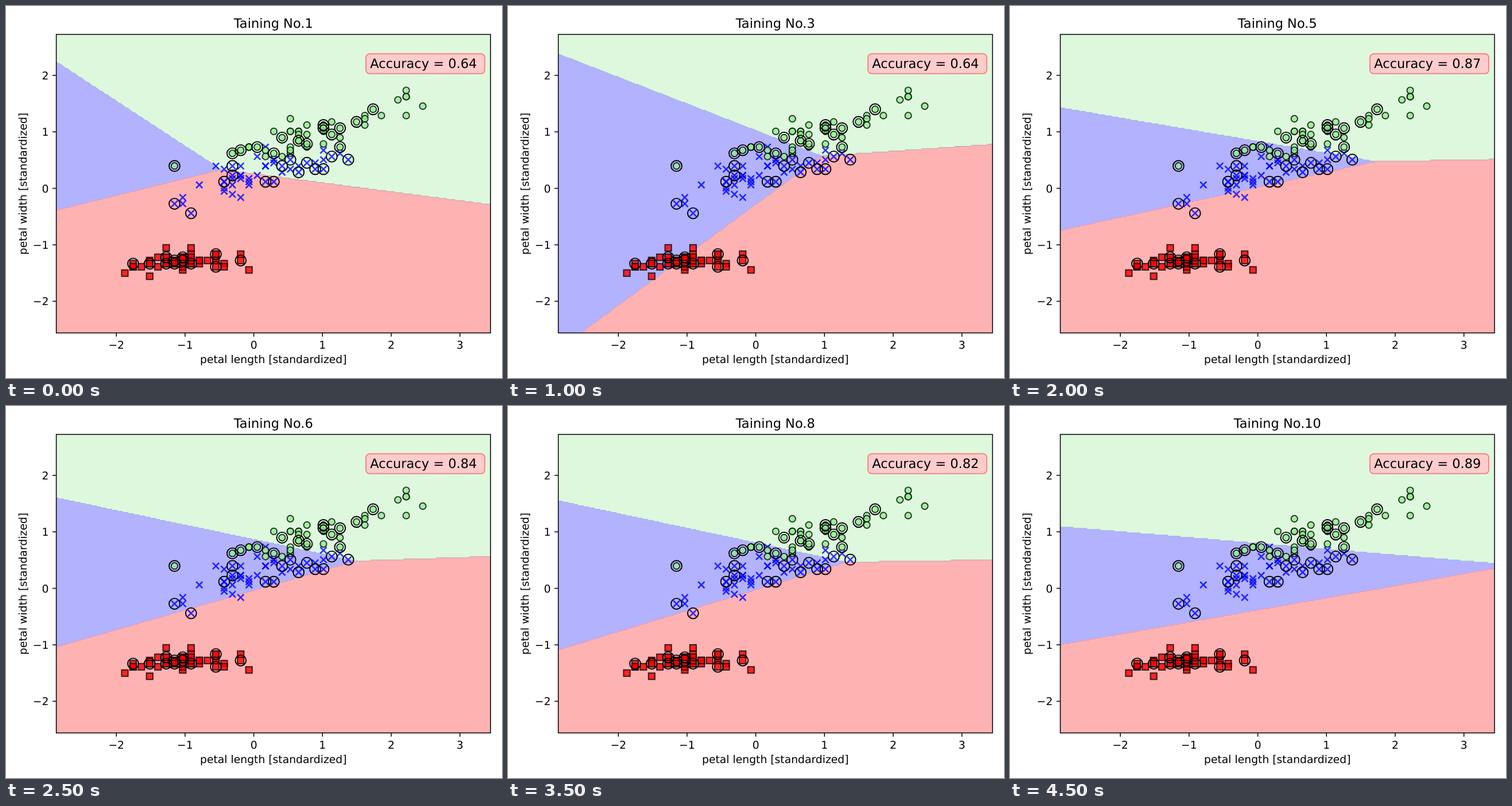
Animation, 864 px wide and 648 px high, one loop 5 s. Source, as an HTML page:

```html
<!DOCTYPE html>
<html lang="en">
<head>
<meta charset="utf-8">
<title>Training steps</title>
<style>
  html, body { margin: 0; width: 100%; height: 100%; overflow: hidden; background: #fff; }
  svg { display: block; width: 864px; height: 648px; }
  text { font: 18.75px "DejaVu Sans", sans-serif; text-rendering: geometricPrecision; }
  .big { font-size: 22.5px; }
</style>
</head>
<body>
<svg id="stage" viewBox="0 0 864 648">
  <clipPath id="plot"><rect x="87.6" y="49.5" width="756.4" height="520"/></clipPath>
  <g id="regions" clip-path="url(#plot)" fill="none"></g>
  <g id="points"></g>
  <g id="axes" fill="none" stroke="#000" stroke-width="1.5"></g>
  <g id="labels"></g>
</svg>
<script>
const STEP_MS = 500;
const LEFT = 87.6, TOP = 49.5, RIGHT = 844, BOTTOM = 569.5;

// Left end of both blue borders, the junction, right end, score.
const steps = [
  { upper: 97, lower: 356, meet: [375, 285], right: 346, score: '0.64' },
  { upper: 207, lower: 410, meet: [635, 290.5], right: 283, score: '0.87' },
  { upper: 83.5, lower: 598.5, meet: [547, 261.3], right: 241, score: '0.64' },
  { upper: 170, lower: 385, meet: [560, 274], right: 285, score: '0.80' },
  { upper: 177, lower: 391, meet: [637, 271], right: 267, score: '0.87' },
  { upper: 160, lower: 420, meet: [610, 270], right: 262, score: '0.84' },
  { upper: 106, lower: 510, meet: [602, 259.3], right: 241, score: '0.78' },
  { upper: 165, lower: 425, meet: [590, 272], right: 268, score: '0.82' },
  { upper: 204, lower: 411, meet: [413, 293.5], right: 310, score: '0.69' },
  { upper: 210, lower: 416, meet: [878, 277], right: 277, score: '0.89' }
];

// Tenths of a unit: column -> rows.
const classes = [
  { shape: 'square', color: '#f00', rows: {
    43: [11], 44: [14, 13, 13], 45: [13], 46: [15, 14, 10, 14], 47: [13, 16],
    48: [16, 14, 19, 16, 14], 49: [14, 15, 15, 14],
    50: [14, 15, 16, 16, 12, 13, 16, 14], 51: [14, 14, 15, 15, 17, 15, 19, 16],
    52: [15, 14, 15], 53: [15], 54: [17, 15, 17, 15, 13], 55: [14, 13],
    57: [17, 15], 58: [12] } },
  { shape: 'cross', color: '#00f', rows: {
    49: [33], 50: [35, 33], 51: [30], 52: [39], 54: [45], 55: [40, 38, 37, 40, 44],
    56: [36, 45, 39, 41, 42], 57: [45, 35, 42, 42, 41], 58: [41, 39, 40],
    59: [42, 48], 60: [40, 45, 51, 45], 61: [47, 40, 47, 46], 62: [45, 43],
    63: [47, 49, 44], 64: [45, 43], 65: [46], 66: [46, 44], 67: [44, 50, 47],
    68: [48], 69: [49], 70: [47] } },
  { shape: 'dot', color: '#90ee90', rows: {
    49: [45], 56: [49], 57: [50], 58: [51, 51, 51], 59: [51], 60: [50, 48],
    61: [49, 56], 62: [48, 54], 63: [60, 56, 49, 51, 56, 50],
    64: [53, 53, 56, 56, 55], 65: [58, 51, 55, 52], 67: [58, 57, 56, 57, 52],
    68: [55, 59], 69: [57, 54, 51], 71: [59], 72: [61, 60, 58], 73: [63],
    74: [61], 76: [66], 77: [67, 69, 67, 61], 79: [64] } }
];
const tested = {
  44: [14], 46: [14], 48: [16, 14], 49: [15, 14, 33, 45], 50: [16, 15], 51: [14, 30],
  54: [17, 13], 55: [40], 56: [45, 42, 49], 57: [15, 50], 59: [51], 60: [40],
  61: [40, 49], 62: [45, 54], 63: [47], 64: [43, 53], 65: [46, 52], 66: [44],
  67: [44, 58, 57], 68: [48, 55], 69: [57, 51], 70: [47], 71: [59], 73: [63]
};

const layer = id => document.getElementById(id);

function add(parent, tag, attrs, content) {
  const el = document.createElementNS('http://www.w3.org/2000/svg', tag);
  for (const key in attrs) el.setAttribute(key, attrs[key]);
  if (content !== undefined) el.textContent = content;
  parent.appendChild(el);
  return el;
}

function eachPoint(rows, draw) {
  for (const col in rows)
    for (const row of rows[col]) draw(207 + 14.416 * (col - 43), 147 + 5.487 * (69 - row));
}

const shapes = {
  square: (x, y, color) => add(layer('points'), 'rect', {
    x: x - 5.62, y: y - 5.62, width: 11.25, height: 11.25, fill: color,
    stroke: '#000', 'stroke-width': 1.9, 'fill-opacity': .8, 'stroke-opacity': .8 }),
  cross: (x, y, color) => add(layer('points'), 'path', {
    d: `M${x - 5.62} ${y - 5.62}l11.25 11.25m0-11.25l-11.25 11.25`, fill: 'none',
    stroke: color, 'stroke-width': 2.6, 'stroke-opacity': .8 }),
  dot: (x, y, color) => add(layer('points'), 'circle', {
    cx: x, cy: y, r: 5.62, fill: color,
    stroke: '#000', 'stroke-width': 1.9, 'fill-opacity': .8, 'stroke-opacity': .8 })
};

for (const { shape, color, rows } of classes)
  eachPoint(rows, (x, y) => shapes[shape](x, y, color));
eachPoint(tested, (x, y) => add(layer('points'), 'circle', {
  cx: x, cy: y, r: 9.4, fill: 'none', stroke: '#000', 'stroke-width': 1.9 }));

// Axes, ticks and fixed labels
const label = (x, y, content, attrs) =>
  add(layer('labels'), 'text', { x, y, 'text-anchor': 'middle', ...attrs }, content);
const signed = n => String(n).replace('-', '\u2212');

add(layer('axes'), 'rect', { x: LEFT, y: TOP, width: RIGHT - LEFT, height: BOTTOM - TOP });
for (let n = -2; n <= 3; n++) {
  const x = 431.6 + 119.7 * n, y = 317.6 - 98.4 * n;
  add(layer('axes'), 'path', { d: `M${x} ${BOTTOM}v6.6` });
  label(x, 597, signed(n));
  if (n < 3) {
    add(layer('axes'), 'path', { d: `M${LEFT} ${y}h-6.6` });
    label(74.4, y + 7, signed(n), { 'text-anchor': 'end' });
  }
}
label(465.8, 622.3, 'petal length [standardized]');
label(0, 0, 'petal width [standardized]', { transform: 'translate(35.6 309.5) rotate(-90)' });
add(layer('labels'), 'rect', { x: 627, y: 83.3, width: 207, height: 34.6, rx: 6.5,
  fill: '#fcc', stroke: '#ff8080', 'stroke-width': 1.9 });
const title = label(465.8, 37.8, '', { class: 'big' });
const score = label(634.3, 107.5, '', { class: 'big', 'text-anchor': 'start' });

// Regions follow a fine grid, so their borders are slightly stepped.
function border([x0, y0], [x1, y1]) {
  const pts = [];
  for (let x = x0; x < x1; x += 2.39) {
    const y = y0 + (y1 - y0) * (x - x0) / (x1 - x0);
    pts.push([x, TOP + Math.round((y - TOP) / 1.97) * 1.97]);
  }
  pts.push([x1, y1]);
  return pts;
}
const path = pts => 'M' + pts.map(p => p.map(v => v.toFixed(2)).join(' ')).join('L');

const regions = layer('regions');
add(regions, 'rect', { x: LEFT, y: TOP, width: RIGHT - LEFT, height: BOTTOM - TOP, fill: '#ddf8dd' });
const red = add(regions, 'path', { fill: '#ffb2b2' });
const blue = add(regions, 'path', { fill: '#b2b2ff' });
const edges = ['#a0acdf', '#ec91ac', '#bf95ad'].map(stroke => add(regions, 'path', { stroke }));

function show(index) {
  const { upper, lower, meet, right, score: value } = steps[index];
  const a = border([LEFT, upper], meet);
  const b = border([LEFT, lower], meet);
  const c = border(meet, [Math.max(RIGHT, meet[0] + 1), right]);
  red.setAttribute('d', path([...b, ...c, [RIGHT + 40, BOTTOM + 40], [LEFT, BOTTOM + 40]]) + 'Z');
  blue.setAttribute('d', path([...a, ...b.slice().reverse()]) + 'Z');
  [a, b, c].forEach((pts, i) => edges[i].setAttribute('d', path(pts)));
  title.textContent = 'Taining No.' + (index + 1);
  score.textContent = 'Accuracy = ' + value;
}

let current = -1;
const start = performance.now();
function tick() {
  const elapsed = Math.max(0, performance.now() - start);
  const index = Math.floor(elapsed / STEP_MS) % steps.length;
  if (index !== current) show(current = index);
  requestAnimationFrame(tick);
}
tick();
</script>
</body>
</html>
```
